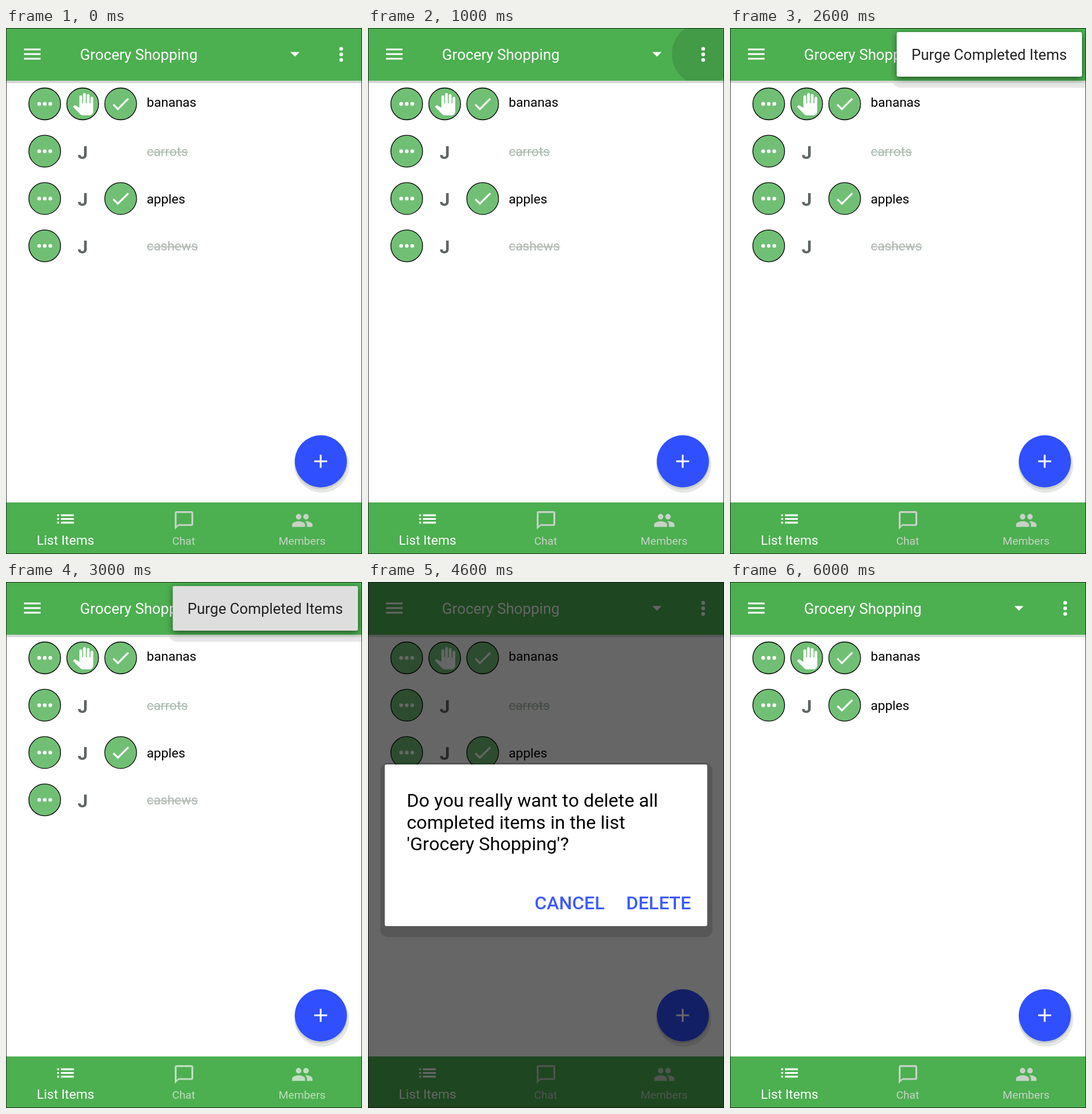
Animation of 616 by 908 pixels, one loop 7 s. Source, as an HTML page with a canvas:

```html
<!DOCTYPE html>
<html lang="en">
<head>
<meta charset="utf-8">
<title>Shopping list</title>
<style>
  html, body { margin: 0; width: 100%; height: 100%; overflow: hidden; background: #fff; }
  canvas { display: block; }
</style>
</head>
<body>
<canvas id="stage" width="616" height="908"></canvas>
<script>
const ctx = document.getElementById('stage').getContext('2d');
const W = 616, H = 908, STEP = 1000, STEPS = 7;
const GREEN = '#4caf50', LEAF = '#71bf75', BLUE = '#3d5afe';
const COLUMNS = [67, 132.7, 198.4];
const ROW_TOP = 131, ROW_GAP = 81.7;

// Icons live in a 24-unit box and are drawn at 1.6 px per unit.
const ICONS = {
  menu: 'M3 18h18v-2H3zM3 13h18v-2H3zM3 6v2h18V6z',
  arrow: 'M7 10l5 5 5-5z',
  check: 'M9 16.17L4.83 12l-1.42 1.41L9 19 21 7l-1.41-1.41z',
  plus: 'M19 13h-6v6h-2v-6H5v-2h6V5h2v6h6z',
  list: 'M3 13h2v-2H3zM3 17h2v-2H3zM3 9h2V7H3zM7 13h14v-2H7zM7 17h14v-2H7zM7 7v2h14V7z',
  chat: 'M20 2H4c-1.1 0-2 .9-2 2v18l4-4h14c1.1 0 2-.9 2-2V4c0-1.1-.9-2-2-2zm0 14H6l-2 2V4h16z',
  people: 'M13 8a3 3 0 1 0 6 0a3 3 0 1 0-6 0zM5 8a3 3 0 1 0 6 0a3 3 0 1 0-6 0z' +
    'M8 13c-2.33 0-7 1.17-7 3.5V19h14v-2.5c0-2.33-4.67-3.5-7-3.5z' +
    'M16 13c-.29 0-.62.02-.97.05 1.16.84 1.97 1.97 1.97 3.45V19h6v-2.5c0-2.33-4.67-3.5-7-3.5z',
  hand: 'M23 5.5V20c0 2.2-1.8 4-4 4h-7.3c-1.08 0-2.1-.43-2.85-1.19L1 14.83s1.26-1.23 1.3-1.25' +
    'c.5-.4 1-.35 1.39-.13L8 15.91V4a1.5 1.5 0 0 1 3 0v7h1V1.5a1.5 1.5 0 0 1 3 0V11h1V2.5' +
    'a1.5 1.5 0 0 1 3 0V11h1V5.5a1.5 1.5 0 0 1 3 0z'
};
for (const name in ICONS) ICONS[name] = new Path2D(ICONS[name]);

function icon(name, x, y, color = '#fff') {
  ctx.save();
  ctx.translate(x, y);
  ctx.scale(1.6, 1.6);
  ctx.translate(-12, -12);
  ctx.fillStyle = color;
  ctx.fill(ICONS[name]);
  ctx.restore();
}

function rect(x, y, w, h, color, radius = 0) {
  ctx.fillStyle = color;
  ctx.beginPath();
  ctx.roundRect(x, y, w, h, radius);
  ctx.fill();
}

function disc(x, y, r, color) {
  ctx.fillStyle = color;
  ctx.beginPath();
  ctx.arc(x, y, r, 0, Math.PI * 2);
  ctx.fill();
}

function text(string, x, y, size, color, { weight = 400, align = 'left' } = {}) {
  ctx.font = `${weight} ${size}px Roboto, sans-serif`;
  ctx.fontKerning = 'none';
  ctx.textAlign = align;
  ctx.fillStyle = color;
  ctx.fillText(string, x, y);
}

function dots(x, y, dx, dy) {
  for (const i of [-1, 0, 1]) disc(x + i * dx, y + i * dy, 3.2, '#fff');
}

function button(x, y) {
  disc(x, y, 27.5, LEAF);
  ctx.strokeStyle = '#000';
  ctx.lineWidth = 1.3;
  ctx.stroke();
}

function itemRow(index, { name, done, mine, color = '#000' }) {
  const [more, claim, tick] = COLUMNS;
  const y = ROW_TOP + index * ROW_GAP;
  const baseline = index ? y + 8.3 : y + 5;
  button(more, y);
  dots(more, y, 9.6, 0);
  if (mine) {
    button(claim, y);
    icon('hand', claim + .7, y + .5);
  } else {
    text('J', claim, y + 13, 31.5, '#5f6661', { weight: 700, align: 'center' });
  }
  if (!done) {
    button(tick, y);
    icon('check', tick, y);
  }
  text(name, 243.6, baseline, 22.5, color);
  if (done) rect(244, baseline - 7.5, ctx.measureText(name).width, 1.6, color);
}

function header(pressed) {
  rect(0, 90, W, 5, '#d3d8d3');
  rect(0, 0, W, 91, GREEN);
  if (pressed) {
    ctx.save();
    ctx.beginPath();
    ctx.rect(0, 0, W, 91);
    ctx.clip();
    disc(580, 45, 54, '#439a47');
    ctx.restore();
  }
  icon('menu', 45.5, 45);
  text('Grocery Shopping', 128, 55.3, 25.75, '#fff');
  icon('arrow', 500, 44.7);
  dots(580, 45.5, 0, 9.6);
}

function addButton() {
  disc(546.5, 754.5, 47.5, '#e5e7e5');
  disc(545, 750.5, 46, '#cdd0cd');
  disc(544.8, 748, 45, '#304ffe');
  icon('plus', 544.5, 748);
}

function tabs(idle) {
  rect(0, 819, W, 89, GREEN);
  icon('list', 103, 847.5);
  icon('chat', 308, 850, idle);
  icon('people', 512.7, 850, idle);
  text('List Items', 103, 892, 22.6, '#fff', { align: 'center' });
  text('Chat', 307.3, 892, 19.2, idle, { align: 'center' });
  text('Members', 512.3, 892, 19.2, idle, { align: 'center' });
}

function popup(pressed) {
  ctx.save();
  ctx.beginPath();
  ctx.rect(0, 95, W, 20);
  ctx.clip();
  rect(280, 60, W - 280, 43, '#e6e6e6', [0, 0, 0, 16]);
  ctx.restore();
  ctx.save();
  ctx.shadowColor = 'rgba(0,0,0,.55)';
  ctx.shadowBlur = 11;
  ctx.shadowOffsetY = 3;
  rect(288.5, 7, 320.5, 77, pressed ? '#dedede' : '#fff', 3);
  ctx.restore();
  text('Purge Completed Items', 314, 55.3, 25.65, '#212321');
}

function dialog(pressed) {
  rect(0, 0, W, H, 'rgba(0,0,0,.6)');
  rect(21.5, 312, 574.5, 301, 'rgba(0,0,0,.15)', 13);
  rect(29, 315, 558, 279, '#fff', 3);
  const lines = ['Do you really want to delete all', 'completed items in the list', "'Grocery Shopping'?"];
  lines.forEach((line, i) => text(line, 67, 388 + i * 37.5, 32.2, '#000'));
  if (pressed) rect(433, 523, 141, 58, '#abb6ff');
  text('CANCEL', 288.3, 565, 32, BLUE, { weight: 500 });
  text('DELETE', 446.8, 565, 32, BLUE, { weight: 500 });
}

function draw(step) {
  const purged = step === 6;
  const items = [
    { name: 'bananas', mine: true },
    { name: 'carrots', done: true, color: '#a9b9ae' },
    { name: 'apples' },
    { name: 'cashews', done: true, color: '#adb5ae' }
  ].filter(item => !(purged && item.done));

  rect(0, 0, W, H, '#fff');
  header(step === 1);
  items.forEach((item, i) => itemRow(i, item));
  addButton();
  tabs(step === 3 ? '#bfdfc0' : '#c7d2c7');
  if (step === 2 || step === 3) popup(step === 3);
  if (step === 4 || step === 5) dialog(step === 5);

  ctx.strokeStyle = 'rgba(0,0,0,.75)';
  ctx.lineWidth = 1;
  ctx.strokeRect(.5, .5, W - 1, H - 1);
}

function tick() {
  draw(Math.floor(performance.now() / STEP) % STEPS);
  requestAnimationFrame(tick);
}
tick();
</script>
</body>
</html>
```
